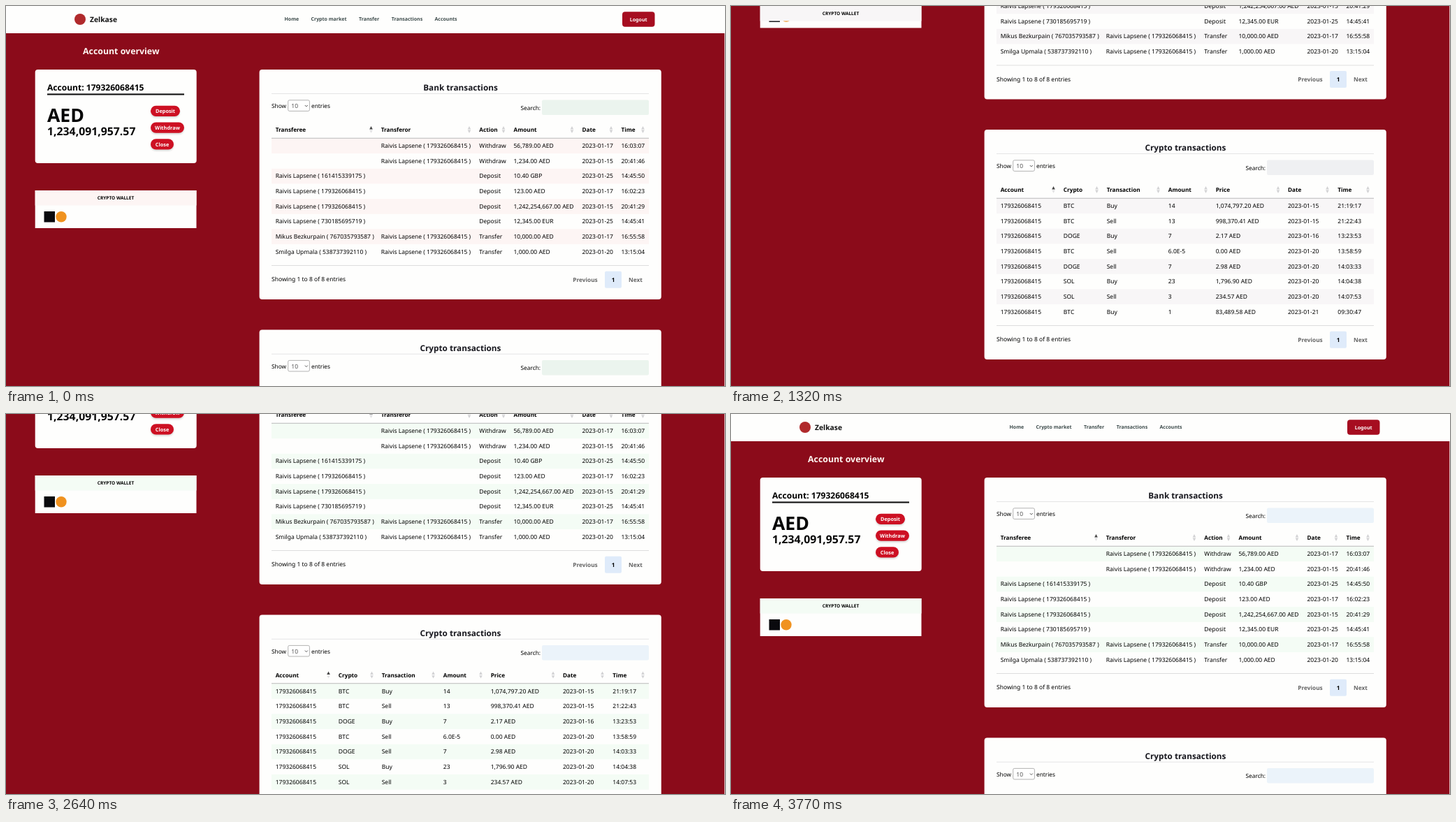
Write an HTML page that moves like this. It is 1029 px wide and 544 px high and loops after 3.9 s.

```html
<!DOCTYPE html>
<html lang="en">
<head>
<meta charset="utf-8">
<title>Account overview</title>
<style>
  html, body { margin: 0; width: 100%; height: 100%; overflow: hidden; background: #fff; }
  svg { display: block; width: 100%; height: 100%; }
  text { font: 8.5px "Noto Sans", "Open Sans", sans-serif; fill: #000; text-rendering: geometricPrecision; white-space: pre; }
  .bold { font-weight: 700; }
  .brand { font-size: 10.3px; fill: #111; }
  .nav { font-size: 7px; fill: #3c4a4a; }
  .logout { font-size: 7.1px; fill: #fff; }
  .overview { font-size: 12.36px; fill: #fff6f2; }
  .account { font-size: 12.05px; }
  .currency { font-size: 26.6px; fill: #050505; }
  .balance { font-size: 15.8px; fill: #080808; }
  .pill { font-size: 7.35px; fill: #fff; }
  .wallet { font-size: 6.5px; }
  .title { font-size: 11.75px; fill: #18181f; }
  .head { font-size: 8.2px; }
  .label { font-size: 8.3px; }
  .option { fill: #555; }
  .pager { font-size: 8.3px; fill: #666; }
  .foot { font-size: 7.45px; fill: #666b73; }
  .mid { text-anchor: middle; }
  .end { text-anchor: end; }
  .card { fill: #fefefd; }
  .stripe { fill: var(--stripe); }
  .field { fill: var(--field); }
  .shadow { fill: #000; opacity: .14; filter: blur(1.2px); }
</style>
</head>
<body>
<svg viewBox="0 0 1029 544" preserveAspectRatio="none"><g id="page"></g></svg>
<script>
const LOOP = 3900;
const BANK = "Zelkase";
const OWNER = "Raivis Lapsene";
const ACCOUNT = "179326068415";
const holder = (name, number) => `${name} ( ${number} )`;
const SELF = holder(OWNER, ACCOUNT);

const text = (x, y, value, cls = "") => `<text x="${x}" y="${y}" class="${cls}">${value}</text>`;
const rect = (x, y, w, h, attrs = "", r = 0) =>
  `<rect x="${x}" y="${y}" width="${w}" height="${h}" rx="${r}" ${attrs}/>`;
const fill = color => `fill="${color}"`;
const path = (d, color) => `<path d="${d}" fill="${color}"/>`;

function sortIcon(x, y, active) {
  return path(`M${x - 2.3} ${y - .6}h4.6l-2.3 -4.4z`, active ? "#444" : "#d2d2d4") +
         path(`M${x - 2.3} ${y + .6}h4.6l-2.3 4.4z`, active ? "#e2e2e4" : "#d2d2d4");
}

function pill(y, width, label) {
  return rect(207, y + 2, width, 15.2, 'class="shadow"', 7.6) +
         rect(207, y, width, 15.2, fill("#cd1023"), 7.6) +
         text(207 + width / 2, y + 10.3, label, "bold pill mid");
}

// columns: [heading, text x, sort icon x]
function tableCard(top, title, columns, rows) {
  const rowHeight = 21.65, firstRow = 98.5;
  const head = columns.map(([name, x, icon], i) =>
    text(x, 89, name, "bold head") + sortIcon(icon, 86, i === 0)).join("");
  const body = rows.map((cells, r) => {
    const y = firstRow + r * rowHeight;
    const stripe = r % 2 ? "" : rect(380, y, 540, rowHeight, 'class="stripe"');
    return stripe + cells.map((cell, c) => text(columns[c][1], y + 13.6, cell)).join("");
  }).join("");
  return `<g transform="translate(0 ${top})">` +
    rect(362.6, 0, 575.2, 329, 'class="card"', 4) +
    text(650.5, 30, title, "bold title mid") +
    rect(380, 34.2, 540, .7, fill("#dcdcdc")) +
    text(380, 55, "Show", "label") + text(437, 55, "entries", "label") +
    rect(403.7, 43.8, 30.7, 15.6, 'fill="#fff" stroke="#929292" stroke-width=".7"', 2) +
    text(408.3, 55, "10", "option") +
    '<path d="M427.8 51l2 2 2-2" fill="none" stroke="#444" stroke-width=".9"/>' +
    text(765, 57.5, "Search:", "label end") +
    rect(767, 43.5, 153, 21.5, 'class="field"', 2) +
    head + body +
    rect(380, 97.8, 540, .8, fill("#aaa")) +
    rect(380, 280.2, 540, .7, fill("#d0d0d0")) +
    text(380, 303.3, "Showing 1 to 8 of 8 entries") +
    text(829, 304, "Previous", "bold pager mid") +
    rect(857, 288.7, 24, 24, fill("#dfebfa"), 2) +
    text(869, 304, "1", "bold head mid") +
    text(901, 304, "Next", "bold pager mid") + "</g>";
}

const bankColumns = [["Transferee", 385.7, 522.5], ["Transferor", 536.7, 663], ["Action", 677.3, 712],
  ["Amount", 726.5, 810], ["Date", 824.5, 866], ["Time", 880.5, 911.5]];
const bankRows = [
  ["", SELF, "Withdraw", "56,789.00 AED", "2023-01-17", "16:03:07"],
  ["", SELF, "Withdraw", "1,234.00 AED", "2023-01-15", "20:41:46"],
  [holder(OWNER, "161415339175"), "", "Deposit", "10.40 GBP", "2023-01-25", "14:45:50"],
  [SELF, "", "Deposit", "123.00 AED", "2023-01-17", "16:02:23"],
  [SELF, "", "Deposit", "1,242,254,667.00 AED", "2023-01-15", "20:41:29"],
  [holder(OWNER, "730185695719"), "", "Deposit", "12,345.00 EUR", "2023-01-25", "14:45:41"],
  [holder("Mikus Bezkurpain", "767035793587"), SELF, "Transfer", "10,000.00 AED", "2023-01-17", "16:55:58"],
  [holder("Smilga Upmala", "538737392110"), SELF, "Transfer", "1,000.00 AED", "2023-01-20", "13:15:04"]
];

const cryptoColumns = [["Account", 385.7, 461.5], ["Crypto", 475.8, 523.5], ["Transaction", 537.7, 611.5],
  ["Amount", 625.8, 679.5], ["Price", 693.7, 783], ["Date", 797, 853.5], ["Time", 868.3, 911.5]];
const cryptoRows = [
  ["BTC", "Buy", "14", "1,074,797.20 AED", "2023-01-15", "21:19:17"],
  ["BTC", "Sell", "13", "998,370.41 AED", "2023-01-15", "21:22:43"],
  ["DOGE", "Buy", "7", "2.17 AED", "2023-01-16", "13:23:53"],
  ["BTC", "Sell", "6.0E-5", "0.00 AED", "2023-01-20", "13:58:59"],
  ["DOGE", "Sell", "7", "2.98 AED", "2023-01-20", "14:03:33"],
  ["SOL", "Buy", "23", "1,796.90 AED", "2023-01-20", "14:04:38"],
  ["SOL", "Sell", "3", "234.57 AED", "2023-01-20", "14:07:53"],
  ["BTC", "Buy", "1", "83,489.58 AED", "2023-01-21", "09:30:47"]
].map(row => [ACCOUNT, ...row]);

const navItems = [["Home", 398.5], ["Crypto market", 436.5], ["Transfer", 505], ["Transactions", 551.7], ["Accounts", 613.5]];
const footerLinks = [["About", 875], ["Privacy Policy", 935], ["Licensing", 980], ["Contact", 1020]];

const header =
  rect(0, 0, 1029, 39, fill("#fefefd")) +
  `<circle cx="106" cy="19" r="8" ${fill("#b02a2c")}/>` +
  text(120, 22.6, BANK, "bold brand") +
  navItems.map(([name, x]) => text(x, 21.4, name, "bold nav")).join("") +
  rect(882, 8.3, 46.5, 21.5, fill("#a60d20"), 4) +
  text(905.2, 21.5, "Logout", "bold logout mid");

const accountCard =
  text(110, 69, "Account overview", "bold overview") +
  rect(41.7, 91, 231, 134, 'class="card"', 4) +
  text(59, 121, `Account: ${ACCOUNT}`, "bold account") +
  rect(59, 125.4, 196, 2.1, fill("#111")) +
  text(59, 166, "AED", "bold currency") +
  text(59, 184.6, "1,234,091,957.57", "bold balance") +
  pill(142.7, 42, "Deposit") + pill(166.5, 48, "Withdraw") + pill(190.3, 33, "Close");

const WALLET_TOP = 264, WALLET_HEIGHT = 54, WALLET_HEAD = 21.5;
const wallet =
  rect(41.7, WALLET_TOP, 230.8, WALLET_HEIGHT, 'class="card"') +
  rect(54.5, 294, 15.5, 15.5, fill("#0a0a0e")) +
  `<circle cx="79" cy="301.7" r="7.7" ${fill("#f0921f")}/>` +
  '<g id="walletHead">' +
  rect(41.7, 0, 230.8, WALLET_HEAD, 'class="stripe"') +
  text(157, 12.8, "CRYPTO WALLET", "bold wallet mid") + "</g>";

const footer =
  rect(0, 862, 1029, 30, fill("#fdfdfe")) +
  text(7, 879, `© 2023 ${BANK}™. All Rights Reserved.`, "foot") +
  footerLinks.map(([name, x]) => text(x, 879, name, "foot end")).join("");

const page = document.getElementById("page");
page.innerHTML =
  rect(0, 0, 1028.3, 892, fill("#8b0b1a")) + header + accountCard + wallet +
  tableCard(91, "Bank transactions", bankColumns, bankRows) +
  tableCard(463.6, "Crypto transactions", cryptoColumns, cryptoRows) + footer;
const walletHead = document.getElementById("walletHead");

// The page scrolls in 50 ms steps, down and then back up.
const STEP = 50;
const scrollDown = { start: 920, offsets: [0, 9, 34, 68, 105, 150, 196, 243, 286.6, 317, 335, 343, 345.6] };
const scrollUp = { start: 2490, offsets: [345.6, 332, 269, 176, 86, 28, 3.8, 1, 0] };

function scrollAt(time) {
  const { start, offsets } = time < scrollUp.start ? scrollDown : scrollUp;
  const step = Math.floor((time - start) / STEP);
  return offsets[Math.max(0, Math.min(step, offsets.length - 1))];
}

function tintAt(time) {
  if (time < 970) return ["#fdf5f4", "#ebf4ee"];
  if (time < 2540) return ["#f8f6f7", "#eff0f2"];
  return ["#f4fcf5", "#ebf3fa"];
}

function draw(now) {
  const time = now % LOOP;
  const scroll = scrollAt(time);
  const [stripe, field] = tintAt(time);
  page.setAttribute("transform", `translate(0 ${-scroll})`);
  // The wallet heading sticks to the top of the window while its box is in view.
  const headTop = Math.min(Math.max(WALLET_TOP, scroll), WALLET_TOP + WALLET_HEIGHT - WALLET_HEAD);
  walletHead.setAttribute("transform", `translate(0 ${headTop})`);
  page.style.setProperty("--stripe", stripe);
  page.style.setProperty("--field", field);
  requestAnimationFrame(draw);
}
draw(performance.now());
</script>
</body>
</html>
```
